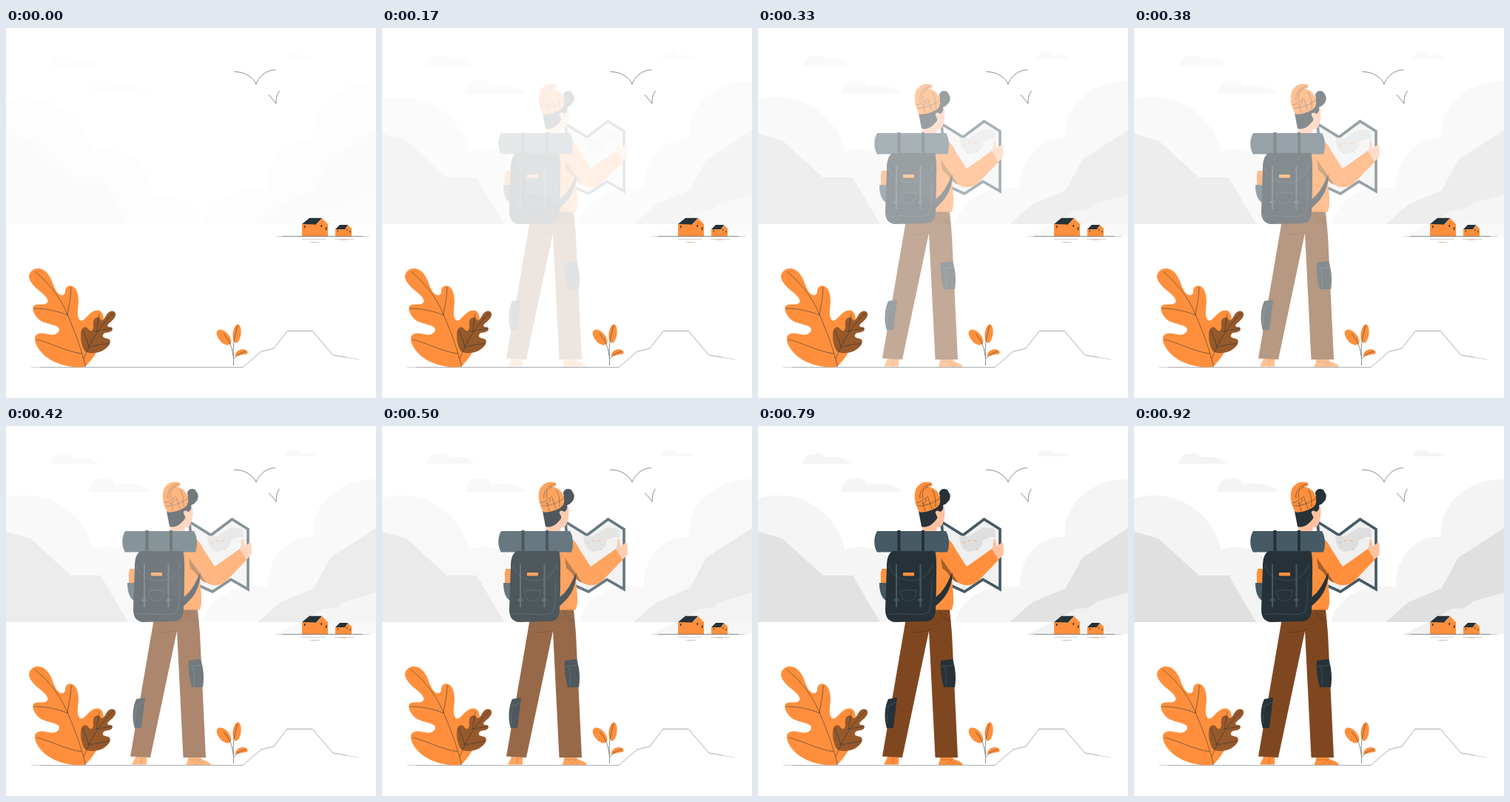
An HTML page for the animation above (1.04 s loop, 500 px wide and 500 px high).

```html
<!DOCTYPE html>
<html lang="en">
<head>
<meta charset="utf-8">
<title>Hiker</title>
<style>
  html, body { margin: 0; width: 100%; height: 100%; overflow: hidden; background: #fff; }
  svg { display: block; width: 100%; height: 100%; }
  .o { fill: #ff8f3c; }
  .d { fill: #263238; }
  .s { fill: #455a64; }
  .k { fill: #ffc09f; }
  .l { fill: none; stroke: #263238; stroke-width: .55; }
  .g { fill: none; stroke: #455a64; stroke-width: .7; }
  .thin { stroke-width: .4; }
  .bold { stroke-width: 2; }
</style>
</head>
<body>
<svg viewBox="0 0 500 500">
  <g id="clouds" fill="#f4f4f4">
    <path d="M0 97C60 82 108 120 117 167C150 155 195 175 196 225C225 222 252 240 264 265H0Z"/>
    <path d="M500 72C450 72 412 105 415 150C385 146 352 175 354 218C325 212 281 220 265 265H500Z"/>
    <path d="M61 51C63 41 68 37 76 38C84 35 90 40 92 43C105 40 118 43 125 51Z"/>
    <path d="M112 89C114 74 124 70 130 71C140 69 146 74 147 79C165 76 186 78 194 89Z"/>
    <path d="M377 41C379 33 387 31 392 33C396 32 398 35 399 37C408 36 417 36 420 41Z"/>
  </g>
  <g id="hills" fill="#e0e0e0">
    <path d="M0 143L33 152L88 202H128L165 265H0Z"/>
    <path d="M500 138L438 178L416 219L371 238L340 265H420L500 236Z"/>
    <path fill="#f1f1f1" d="M500 225L458 237L446 246L429 247L402 263L365 281H500Z"/>
  </g>

  <g id="houses">
    <path class="o" d="M400 265H420L427 257L435 265V281.500H400ZM445 272H458L462 266L467 271V281.500H445Z"/>
    <path class="d" d="M400 265L410 256.700H427L419 265.500ZM445 272L451 266H462L458 272ZM403 267h1.500v3h-1.500zM425.500 266h1.500v3h-1.500zM432 269h1.300v4h-1.300zM448 273.500h1v2h-1zM460.500 272h1v2h-1zM464.500 274h1v2.500h-1z"/>
    <path class="l" d="M373 281.500H482"/>
    <path class="l" opacity=".4" d="M365 281.500H373M482 281.500H491M400 285.500H432M410 289.500H424M444 285.500H470"/>
    <path stroke="#ff8f3c" stroke-width=".5" d="M414 289.500H419M452 286.500H460"/>
  </g>

  <path class="l" d="M308 59C322 59 334 66 338 76C341 67 350 57 364 56.500M355 90L365 102C365 96 366 88 370 85"/>
  <path class="l thin" d="M46 458.500H320L345 437L362 433L380 409.500H414L442 442L460 445"/>
  <path class="l thin" opacity=".5" d="M34 458.500H46M460 445L477 448"/>

  <g id="leaves">
    <path class="o" d="M43 325C52 325 58 332 62 342C66 353 70 362 77 361C83 359 77 351 85 348.500C93 347 98 356 98 370C97 380 95 392 101 395.500C108 396 112 381.500 124.500 381.500C134 384 131 395 133 405C131 426 119 447 107 457.500C90 461 66 454 53 443.500C45 436 38 427 39 418C42 410 52 412.500 60 414.500C68 415.500 74 410 71 405C66 400 51 400 44 393.500C38 388 34 379 38 375C43 371.500 52 376 56 371C59 365 48 358 42 352.500C35 346 31 341 31 335C32 329 37 325 43 325Z"/>
    <path class="l" d="M39 329C62 348 77 370 85 392C95 415 103 438 107.500 458M37 379C55 379 72 383 83 388M88 350C88 365 84 380 83 388M41 421C60 425 80 437 102 440"/>
    <path fill="#96592b" d="M141 383C147 381 150 386 147 391C144 396 138 399 137 402C138 406 144 402 144 407C143 413 134 410 131 414C129 418 134 419 138 420C143 422 141 428 136 432C128 440 114 441 107 437C101 430 100 414 102 408C105 402 110 404 112 408C115 411 118 409 118 403C117 396 119 391 124 391C128 391 127 396 130 395C134 394 135 385 141 383Z"/>
    <path class="l" d="M145 385C130 400 115 420 105 447M122 410C124 403 125 392 126 386M143 406C134 408 127 408 121 410M112 432C120 428 132 428 139 426M103 408C107 415 110 423 112 431"/>
    <ellipse class="o" rx="12.500" ry="7" transform="translate(294.500 418)rotate(48)"/>
    <ellipse class="o" rx="5.500" ry="12.500" transform="translate(312 413)rotate(7)"/>
    <path class="o" d="M310 444C309 438 315 434 321 434C328 436 328 440 324 441C318 441 314 443 310 444Z"/>
    <path class="l" d="M307.500 456C308 440 305 430 300 421L294 413M307.500 444C306 430 309 415 313 402M308 447C311 443 316 439 324 437"/>
  </g>

  <g id="hiker">
    <path fill="#f0f0f0" stroke="#455a64" stroke-width="3.700" d="M248 129.500L277 147.500L305.500 126L327 139.500V220.500L304 207.500L279 224L255 213Z"/>
    <path fill="#dedede" d="M272 148L285 149L296 142L305 137L320 139L321 150L313 150L304 154.500C305 163 296 170 284 170C276 167 272 158 272 148Z"/>
    <path fill="none" stroke="#ff8f3c" stroke-width=".7" stroke-dasharray="4 4" d="M277 159C282 153 290 155 300 156M295 166L300 170"/>
    <path class="k" d="M315 168C319 163 317 155 319.500 152C322 153 321 160 323 163C326 160 329 157 331 158C332 165 333 172 330 176L323 182Z"/>

    <path class="o" d="M175 447H190V457.500H170.500C171 454 174 451 175 447ZM246 448H263C265 453 274 451 277 458H244C244 454 247 452 246 448Z"/>
    <path fill="none" stroke="#9a5522" stroke-width=".5" d="M183 448V457M246 451H263M256 456L262 452M262 457L267 453"/>
    <path fill="#7f4720" d="M200 260H232V248H259L262 280L270 448H239.500L231 277L195 448L168 446.500Z"/>
    <path fill="none" stroke="#3e2a1c" stroke-width=".6" d="M245 250C249 258 254 262 260 264M211 279C220 278 226 278 232 275"/>
    <path class="d" d="M247 317L263 315C267 328 268 340 266 353H251C248 342 246 328 247 317ZM176 369L188 367L183 408L174 408.500C170 395 171 380 176 369Z"/>
    <path class="g" d="M248 325L264 323M252 326C255 335 254 342 254 351M186 374L176 378L174 402"/>

    <path class="o" d="M232 152C255 146 261 155 266 165L282 190L316 166L325 181L299 208C290 217 278 217 270 211L262 200C262 215 265 228 264 240L262 248.500H232Z"/>
    <path fill="#a96029" d="M247 178L271 212C263 209 259 204 256 198L249 192Z"/>
    <path class="d" d="M263 198C262 220 253 233 239 244V232C250 225 256 212 260 203Z"/>

    <path class="k" d="M222 130L240 110C246 106 251 107 252 110C253 120 252 126 250 131C248 137 244 138 242 136L241 143H222Z"/>
    <path class="d" d="M217 115C228 117 238 112 245 106C243 100 245 96 246 94C243 90 247 84 252 85C256 85 257 88 258 90C261 93 260 100 256 103C254 106 252 106 250 107C251 112 249 115 246 116C242 113 239 115 240 118C241 121 243 122 242 125C237 132 230 138 221 136Z"/>
    <path class="o" d="M218 116.500C211 104 210 92 214 84C218 77 226 74 233 76C238 79 234 82 230 82C238 83 245 89 246 98C247 105 244 109 240 111C232 115 225 117 218 116.500Z"/>
    <path class="l" d="M235 79C226 78 217 88 219 98M230 82C223 84 221 91 223 98M214 104C219 103 224 100 230 95M216 108C228 108 239 103 245 98M223 104L226 115M230 97L235 112M235 86C239 91 240 98 240 109M227 99C228 102 225 105 221 104"/>

    <path class="o" d="M167 193H175V213H166V203C165 199 167 197 167 193Z"/>
    <path class="s" d="M164 212H175V237C167 234 164 224 164 212Z"/>
    <path class="s" d="M161 142H254C259 150 259 162 256 170.500H161C156 163 156 150 161 142Z"/>
    <path class="d" d="M182 169H239C242 175 241 200 241 215L240 250C239 258 236 264 226 264L185 265C176 264 172 258 172 248L174 190C174 180 176 172 182 169Z"/>
    <path class="d" d="M188.500 141h4v31h-4zM221 141h4v31h-4z"/>
    <path class="g" d="M177 188C181 202 192 208 207 209C221 209 232 202 236 185M193 222H214C214 232 209 237 203 237C196 237 193 231 193 222M178 255C195 251 222 259 231 251C235 245 234 230 235 205M183 236H191M215 236H223"/>
    <path class="g bold" d="M187 187V245M219.500 187V245M184 235H190M216.500 235H222.500"/>
    <path class="o" d="M196 198h15v4.500h-15z"/>
  </g>
</svg>
<script>
  const [clouds, hills, hiker] = ['clouds', 'hills', 'hiker'].map(id => document.getElementById(id));
  const LOOP = 1040, FADE = 700, FPS = 24;

  function draw(now) {
    // Everything advances in 24 fps steps, first visible at the second one.
    const step = Math.floor(now % LOOP * FPS / 1000 + .1);
    const sec = step < 2 ? 0 : step / FPS;
    const t = Math.min(sec * 1000 / FADE, 1);
    hiker.style.opacity = (1 - Math.cos(Math.PI * t)) / 2;
    // The landscape fades in evenly over the whole loop.
    hills.style.opacity = Math.min(.06 + 1.03 * sec, 1);
    clouds.style.opacity = Math.min(.15 + .92 * sec, 1);
  }

  const start = performance.now();
  function tick() {
    draw(performance.now() - start);
    requestAnimationFrame(tick);
  }
  tick();
</script>
</body>
</html>
```
